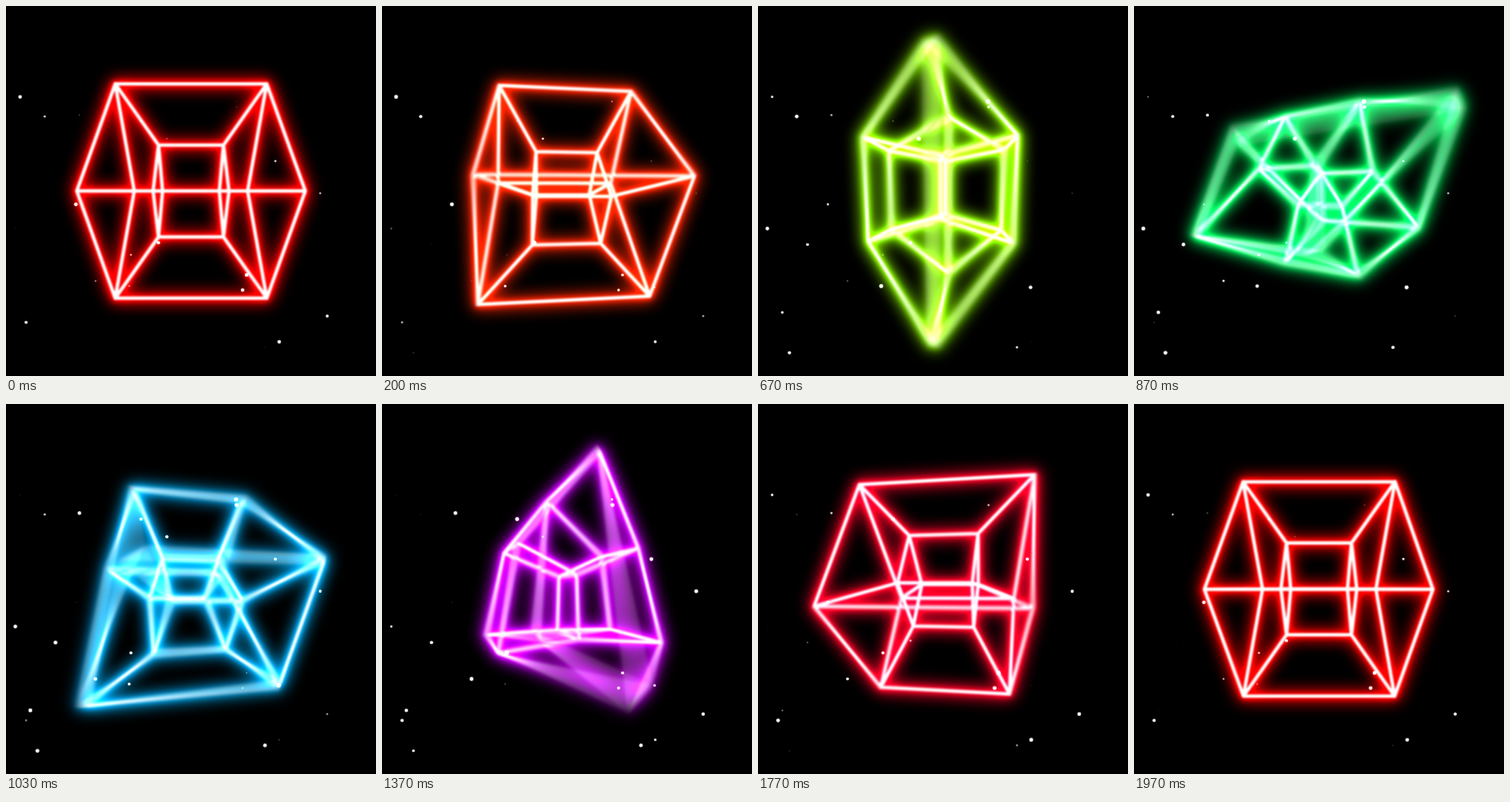
Write an HTML page with a canvas that moves like this. It is 500x500 px and loops after 2010 ms.

```html
<!DOCTYPE html>
<html lang="en">
<head>
<meta charset="utf-8">
<title>Turning tesseract</title>
<style>
  html, body { margin: 0; width: 100%; height: 100%; overflow: hidden; background: #000; }
  canvas { display: block; }
</style>
</head>
<body>
<canvas id="stage" width="500" height="500"></canvas>
<script>
const SIZE = 500, LOOP = 2010, STEPS = 50, SHUTTER = 0.6, SAMPLES = 17, STARS = 25;
const ctx = document.getElementById('stage').getContext('2d');
const buffer = document.createElement('canvas');
buffer.width = buffer.height = SIZE;
const pen = buffer.getContext('2d');
pen.lineCap = pen.lineJoin = 'round';
pen.globalCompositeOperation = 'lighter';
pen.globalAlpha = 1 / SAMPLES;

// The two glows add up to the full hue; the core adds its complement, giving white
const layers = [
  { width: 14, blur: 10, alpha: 1, shift: 0 },
  { width: 11, blur: 3, alpha: 0.55, shift: 0 },
  { width: 4.6, blur: 1, alpha: 1, shift: 180 }
];

let seed = 48271123;
const random = () => (seed = seed * 16807 % 2147483647) / 2147483647;
const stars = Array.from({ length: STARS }, () => ({
  x: 10 + 455 * random(),
  y: 80 + 400 * random(),
  peak: random()
}));

const corners = [], edges = [];
for (let i = 0; i < 16; i++) {
  const [a, b, c, d] = [1, 2, 4, 8].map(bit => i & bit ? 1 : -1);
  corners.push([a, (b + c) * Math.SQRT1_2, (b - c) * Math.SQRT1_2, d]);
  for (const bit of [1, 2, 4, 8]) if (!(i & bit)) edges.push([i, i | bit]);
}

const ease = p => p < 0.5 ? 2 * p * p : 1 - 2 * (1 - p) ** 2;

// Double rotation (xz and yw), then perspective from 4D to the screen
function wireframe(angle) {
  const c = Math.cos(angle), s = Math.sin(angle);
  const points = corners.map(([x, y, z, w]) => {
    const scale = 430 / (7 - 2.8 * (w * c + y * s) - (z * c - x * s));
    return [250 + scale * (x * c + z * s), 250 + scale * (y * c - w * s)];
  });
  const path = new Path2D();
  for (const [i, j] of edges) {
    path.moveTo(...points[i]);
    path.lineTo(...points[j]);
  }
  return path;
}

function drawDot(x, y, radius, alpha) {
  ctx.globalAlpha = Math.min(1, alpha);
  ctx.beginPath();
  ctx.arc(x, y, radius, 0, 2 * Math.PI);
  ctx.fill();
}

function drawStar({ x, y, peak }, phase) {
  const glow = 0.5 + 0.5 * Math.cos(2 * Math.PI * (phase - peak));
  drawDot(x, y, 1 + 2.2 * glow, 0.3 * glow);
  drawDot(x, y, 0.7 + 1.5 * glow, 1.4 * glow);
}

function draw(step) {
  ctx.globalCompositeOperation = 'source-over';
  ctx.globalAlpha = 1;
  ctx.fillStyle = '#000';
  ctx.fillRect(0, 0, SIZE, SIZE);
  ctx.globalCompositeOperation = 'lighter';

  // Motion blur: average of poses while the shutter is open
  const poses = Array.from({ length: SAMPLES }, (_, i) => {
    const turn = ease((step + SHUTTER * i / SAMPLES) / STEPS);
    return { hue: 360 * turn, path: wireframe(2 * Math.PI * turn) };
  });
  for (const { width, blur, alpha, shift } of layers) {
    pen.clearRect(0, 0, SIZE, SIZE);
    pen.lineWidth = width;
    for (const { hue, path } of poses) {
      pen.strokeStyle = `hsl(${hue + shift}, 100%, 50%)`;
      pen.stroke(path);
    }
    ctx.filter = `blur(${blur}px)`;
    ctx.globalAlpha = alpha;
    ctx.drawImage(buffer, 0, 0);
  }
  ctx.filter = 'none';
  ctx.fillStyle = '#fff';
  for (const star of stars) drawStar(star, step / STEPS);
}

// 25 poses per second shown on a 30 Hz clock: every sixth tick repeats a pose
function stepAt(ms) {
  const time = Math.floor(ms % LOOP / 10) * 10;
  const tick = Math.min(59, Math.floor((time + 3.4) * 0.03));
  return tick - Math.floor((tick + 3) / 6);
}

let shown = -1;
function update() {
  const step = stepAt(performance.now());
  if (step !== shown) draw(shown = step);
  requestAnimationFrame(update);
}
update();
</script>
</body>
</html>
```
